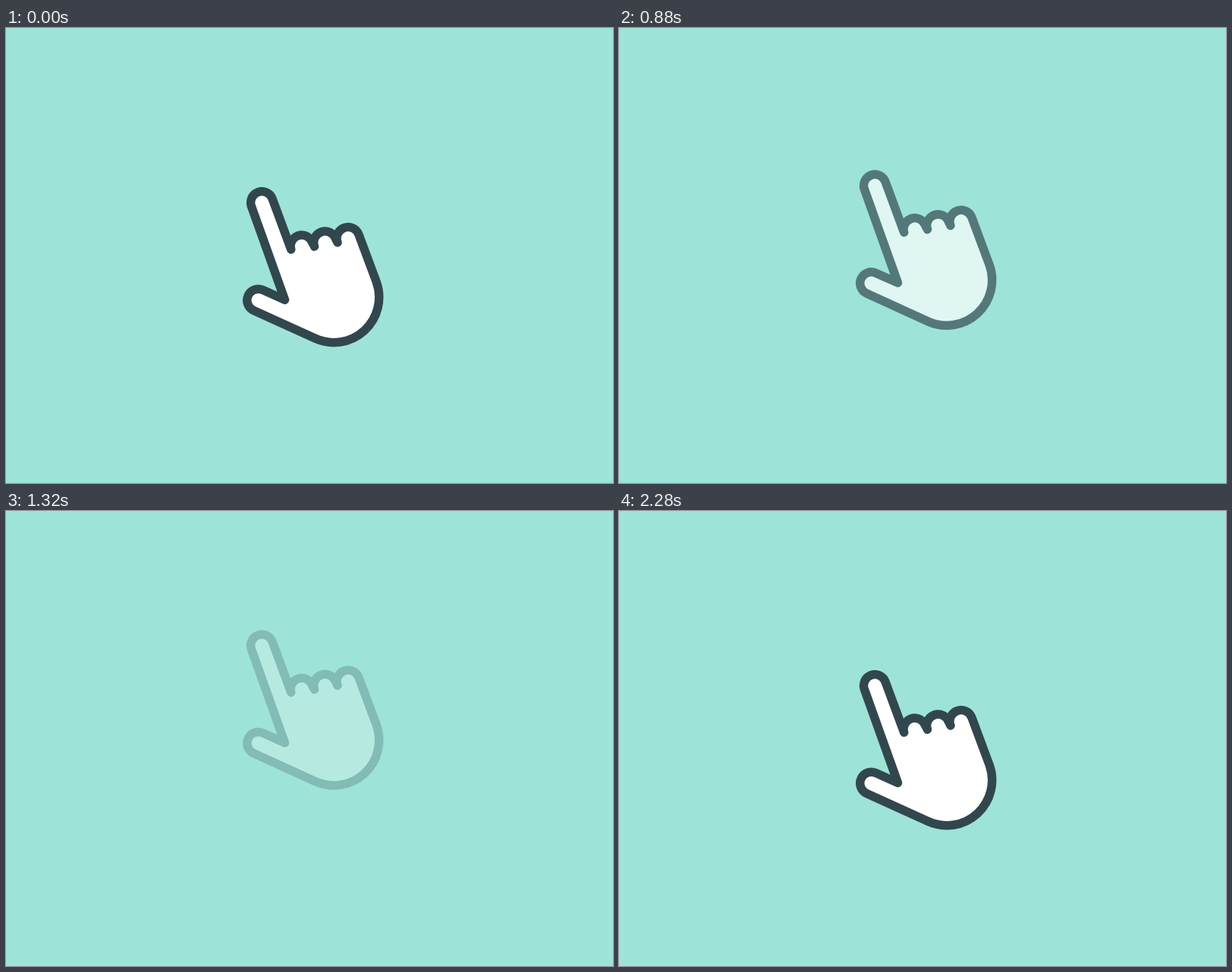
An HTML page that plays this animation: 800x600 px, repeating every 2360 ms.

```html
<!DOCTYPE html>
<html lang="en">
<head>
<meta charset="utf-8">
<title>Swipe up hand</title>
<style>
  html, body { margin: 0; height: 100%; overflow: hidden; background: #9ee3d8; }
  svg { display: block; width: 100%; height: 100%; }
  path { fill: #fff; stroke: #32474d; stroke-width: 11.5; stroke-linejoin: round; }
</style>
</head>
<body>
<svg viewBox="0 0 800 600">
  <g id="hand">
    <path d="M350.8 224.5 A14.7 14.7 0 0 0 323.2 234.5 L367.5 358.5
      L338.6 345.6 A14.7 14.7 0 0 0 326.4 372.4 L406.8 409.1
      A59.7 59.7 0 0 0 488.1 334.6 L464.8 272
      A14.7 14.7 0 0 0 437 283 L434.5 278
      A14.7 14.7 0 0 0 406.5 288 L403.3 282
      A14.7 14.7 0 0 0 375.7 292 Z"/>
  </g>
</svg>
<script>
  const LOOP = 2360, STEP = 40, START = 500, DURATION = 1800, RISE = 70;
  const REST = 1640, RESET = 2240;
  const hand = document.getElementById('hand');

  // cubic-bezier(.25, .1, .25, 1), solved by bisection
  function ease(x) {
    let lo = 0, hi = 1, s = 0.5;
    for (let i = 0; i < 24; i++) {
      s = (lo + hi) / 2;
      if (0.75 * s * (1 - s) + s ** 3 < x) lo = s; else hi = s;
    }
    return 0.3 * s * (1 - s) ** 2 + 3 * (1 - s) * s * s + s ** 3;
  }

  function progress(t) {
    if (t <= START || t >= RESET) return 0;
    return ease((Math.min(t, REST) - START) / DURATION);
  }

  function draw(now) {
    const t = Math.floor((now % LOOP) / STEP) * STEP;
    const p = progress(t);
    hand.setAttribute('transform', `translate(0 ${-RISE * p})`);
    hand.setAttribute('opacity', 1 - p);
  }

  function tick() {
    draw(performance.now());
    requestAnimationFrame(tick);
  }
  tick();
</script>
</body>
</html>
```
